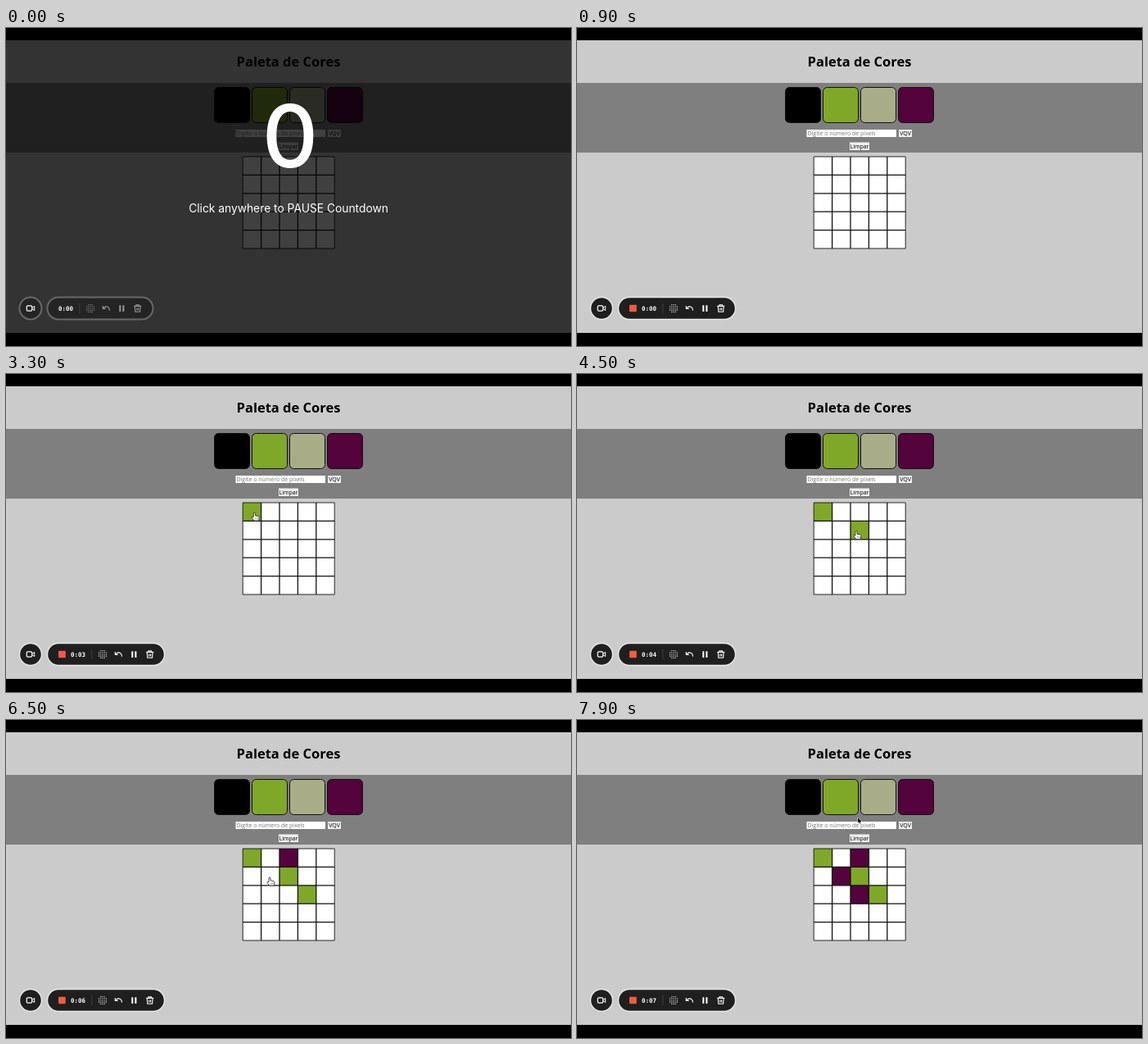
Write an HTML page with a canvas that moves like this. It is 690x388 px and loops after 8 s.

```html
<!DOCTYPE html>
<html lang="pt-BR">
<head>
<meta charset="utf-8">
<title>Paleta de Cores</title>
<style>
html, body { margin: 0; width: 100%; height: 100%; overflow: hidden; background: #000; }
canvas { display: block; }
</style>
</head>
<body>
<canvas id="stage" width="690" height="388"></canvas>
<script>
const ctx = document.getElementById('stage').getContext('2d');
const LOOP = 8000, STEP = 100;
const SANS = '"Open Sans", "Noto Sans", sans-serif';
const GREEN = '#7fa829', PLUM = '#54033c';
const PALETTE = ['#000', GREEN, '#a9ad87', PLUM];
const GRID = { x: 289.2, y: 157, cell: 22.4, n: 5 };

// [time, column, row, colour]
const FILLS = [
  [3300, 0, 0, GREEN], [4500, 2, 1, GREEN], [5000, 3, 2, GREEN],
  [6200, 2, 0, PLUM], [6900, 1, 1, PLUM], [7600, 2, 2, PLUM]
];

// [start, end, x, y]: the pointer reaches x, y at the end time
const MOVES = [
  [1000, 1000, 427, 108], [1000, 1400, 326, 94.3], [2100, 2800, 303.3, 169.6],
  [3500, 4200, 341, 192], [4500, 4800, 363, 212], [5000, 5500, 418, 104],
  [5600, 6100, 344, 170], [6200, 6500, 322, 192.6], [6900, 7400, 336, 214],
  [7600, 7900, 343, 119]
];

const HAND = new Path2D('M-1 5V.4Q-1-.6 0-.6T1 .4V3.2L5 4Q6 4.4 6 5.5L5.3 9.5H0L-3 6Q-3.4 5-2.4 4.9Z');
const ARROW = new Path2D('M0 0V6.6L1.5 5.3L2.5 7.6L3.6 7.1L2.6 4.9H4.6Z');

function box(x, y, w, h, r, fill, stroke, line = 1) {
  ctx.beginPath();
  ctx.roundRect(x, y, w, h, r);
  if (fill) { ctx.fillStyle = fill; ctx.fill(); }
  if (stroke) { ctx.strokeStyle = stroke; ctx.lineWidth = line; ctx.stroke(); }
}

function text(str, x, y, font, color, align = 'left') {
  ctx.font = font;
  ctx.fillStyle = color;
  ctx.textAlign = align;
  ctx.fillText(str, x, y);
}

function strokePath(d, color, line = 1) {
  ctx.strokeStyle = color;
  ctx.lineWidth = line;
  ctx.stroke(new Path2D(d));
}

function drawGrid(t) {
  const { x, y, cell, n } = GRID, size = cell * n;
  box(x, y, size, size, 0, '#fff');
  for (const [at, col, row, color] of FILLS) {
    if (t >= at) box(x + col * cell, y + row * cell, cell, cell, 0, color);
  }
  ctx.strokeStyle = '#111';
  for (let i = 0; i <= n; i++) {
    const p = i * cell;
    ctx.lineWidth = i % n ? 1.3 : 0.9;
    ctx.beginPath();
    ctx.moveTo(x + p, y);
    ctx.lineTo(x + p, y + size);
    ctx.moveTo(x, y + p);
    ctx.lineTo(x + size, y + p);
    ctx.stroke();
  }
}

function drawPage(t) {
  box(0, 15, 690, 357, 0, '#cbcbcb');
  box(0, 67, 690, 85, 0, '#7f7f7f');
  text('Paleta de Cores', 345, 47, `bold 16.5px ${SANS}`, '#000', 'center');
  PALETTE.forEach((c, i) => box(254.5 + i * 46, 72.5, 43, 43, 5, c, '#111'));
  const small = `7px ${SANS}`;
  box(280.5, 124, 109.5, 9, 0, '#fff');
  text('Digite o número de pixels', 281.5, 131, small, '#757575');
  box(393, 124, 16, 9, 0, '#efefef');
  text('VQV', 401, 131, small, '#000', 'center');
  box(333, 139.5, 24, 9.5, 0, '#efefef');
  text('Limpar', 345, 146.6, small, '#000', 'center');
  drawGrid(t);
}

function drawToolbar(t, waiting) {
  const ring = waiting ? '#686868' : '#e9e9e9';
  const fill = waiting ? '#242424' : '#1f1f1f';
  const icon = waiting ? '#999' : '#fff';
  const line = waiting ? 2 : 1.4;
  const dx = waiting ? -15 : 0;

  box(16.5, 328.5, 27, 27, 13.5, fill, ring, line);
  box(25.3, 338.8, 6.4, 6.4, 1.2, null, '#fff', 1.2);
  strokePath('M32 341.3L34.7 339.4V344.6L32 342.7', '#fff');

  box(50.5, 328.5, 143 + (waiting ? -14 : 0), 27, 13.5, fill, ring, line);
  if (!waiting) box(64, 337.8, 8.8, 8.4, 1, '#f05a45');
  text('0:0' + Math.floor(t / 1000), 79 + dx, 344.7,
    'bold 7.5px "DejaVu Sans Mono", monospace', '#fff');

  ctx.save();
  ctx.translate(dx, 0);
  box(104.5, 336, 0.8, 12, 0, '#484848');
  for (let i = -2; i <= 2; i++) {
    for (let j = -2; j <= 2; j++) {
      if (Math.abs(i) + Math.abs(j) < 4) {
        box(117.4 + i * 2.2, 341.4 + j * 2.2, 1.2, 1.2, 0.6, icon);
      }
    }
  }
  strokePath('M133.3 339V342.5H136.8M133.5 342.3Q137.5 338 140.3 341.2Q141.6 342.6 141.4 344.8', icon, 1.1);
  box(153.3, 338.3, 2, 7.6, 0.5, icon);
  box(157.4, 338.3, 2, 7.6, 0.5, icon);
  strokePath('M171.2 339.4H180.2M174 339.2V337.7H177.4V339.2M172.3 339.6L172.8 346.2H178.6L179.1 339.6M174.8 341.4V344.4M176.6 341.4V344.4', icon, 1.1);
  ctx.restore();
}

function pointerAt(t) {
  let [, , x, y] = MOVES[0];
  for (const [start, end, tx, ty] of MOVES) {
    if (t <= start) continue;
    const p = Math.min(1, (t - start) / (end - start || 1));
    const e = p * p * (3 - 2 * p);
    x += (tx - x) * e;
    y += (ty - y) * e;
  }
  return [x, y];
}

const inside = (x, y, l, t, r, b) => x >= l && x <= r && y >= t && y <= b;

function drawPointer(t) {
  if (t < MOVES[0][0]) return;
  const [x, y] = pointerAt(t);
  const size = GRID.cell * GRID.n;
  const onSwatch = inside(x, y, 254, 72, 436, 116);
  const onGrid = inside(x, y, GRID.x, GRID.y, GRID.x + size, GRID.y + size);
  ctx.save();
  ctx.translate(x, y);
  ctx.lineJoin = 'round';
  if (onSwatch || onGrid) {
    ctx.fillStyle = '#fff';
    ctx.fill(HAND);
    ctx.strokeStyle = '#222';
    ctx.lineWidth = 0.8;
    ctx.stroke(HAND);
    strokePath('M1.2 6V8M2.8 6V8M4.2 6V8', '#555', 0.5);
  } else if (inside(x, y, 280, 124, 390, 133)) {
    strokePath('M-1.5-4H1.5M0-4V4M-1.5 4H1.5', '#222', 0.8);
  } else {
    ctx.strokeStyle = '#fff';
    ctx.lineWidth = 1;
    ctx.stroke(ARROW);
    ctx.fillStyle = '#000';
    ctx.fill(ARROW);
  }
  ctx.restore();
}

function drawCountdown() {
  box(0, 15, 690, 357, 0, 'rgba(0,0,0,.75)');
  text('0', 347, 169.5, '500 106px Inter, sans-serif', '#fff', 'center');
  text('Click anywhere to PAUSE Countdown', 345, 225.3, '13.8px Inter, sans-serif', '#fff', 'center');
}

function render(t) {
  const waiting = t < 100;
  ctx.fillStyle = '#000';
  ctx.fillRect(0, 0, 690, 388);
  drawPage(t);
  if (waiting) drawCountdown();
  drawToolbar(t, waiting);
  drawPointer(t);
}

let origin = null;
function tick(now) {
  if (origin === null) origin = now;
  const t = Math.max(0, now - origin) % LOOP;
  render(Math.floor(t / STEP) * STEP);
  requestAnimationFrame(tick);
}
render(0);
requestAnimationFrame(tick);
</script>
</body>
</html>
```
